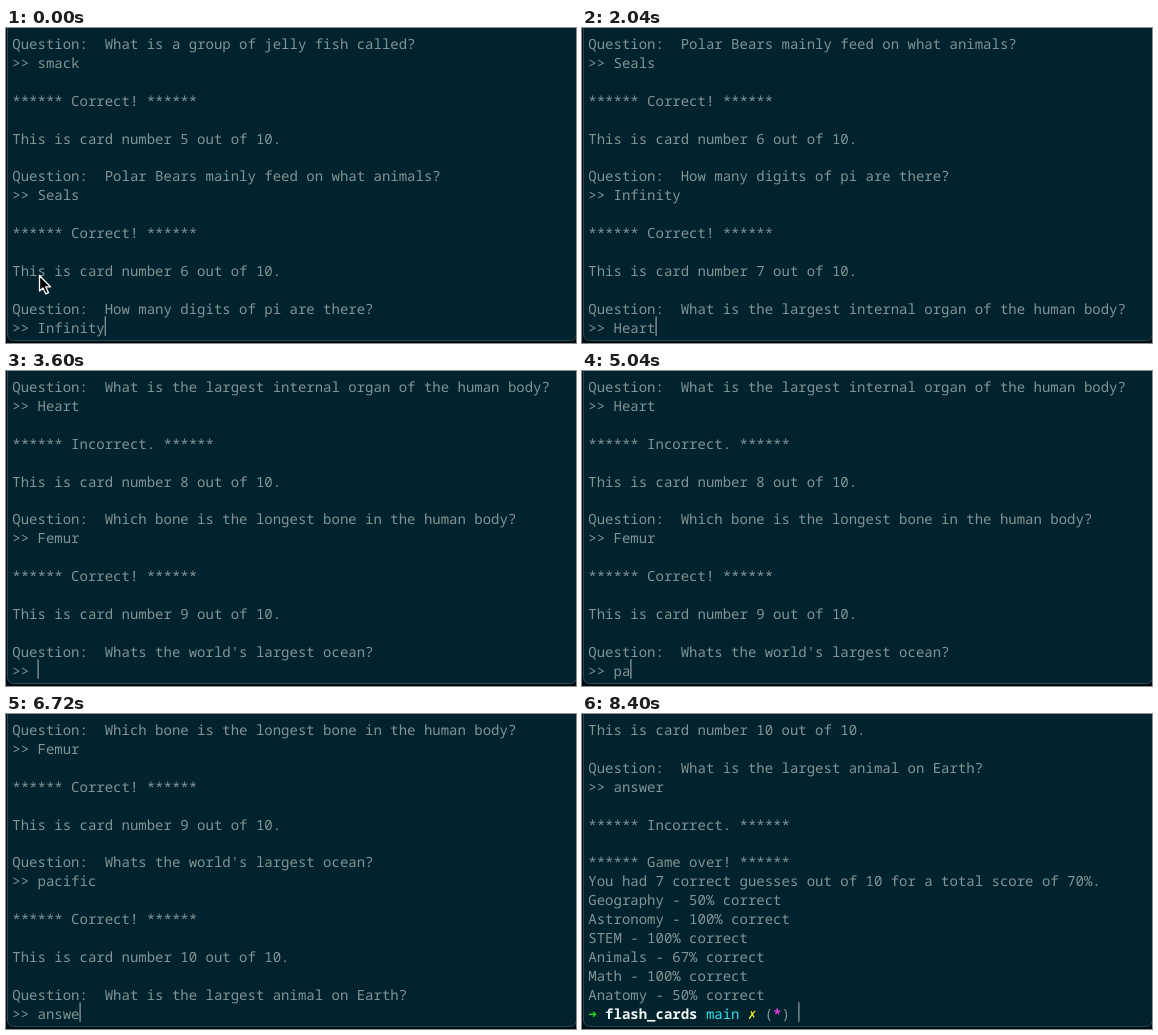
An HTML page for the animation above (8.46 s loop, 570 px wide and 315 px high).

```html
<!DOCTYPE html>
<html lang="en">
<head>
<meta charset="utf-8">
<title>Flash cards in a terminal</title>
<style>
  html, body { margin: 0; width: 100%; height: 100%; overflow: hidden; background: #000d12; }
  svg { display: block; width: 570px; height: 315px; }
  text {
    font: 14px "Noto Sans Mono", "DejaVu Sans Mono", monospace;
    fill: #839496;
    white-space: pre;
    text-rendering: geometricPrecision;
    font-variant-ligatures: none;
  }
  .bold { font-weight: 700; }
</style>
</head>
<body>
<svg viewBox="0 0 570 315">
  <rect x="1.5" y="-10" width="569" height="322.5" rx="6" fill="#01232d" stroke="#34474e"/>
  <g id="screen"></g>
  <rect id="caret" width="1.2" height="19.5" fill="#92a1a2"/>
  <path id="pointer" d="M0 0V15.6L3.5 12.4L6.3 18.4L9 17.2L6.2 11.3H11Z"
        fill="#000" stroke="#fff" stroke-width="1.3" stroke-linejoin="round"/>
</svg>
<script>
const LOOP = 8460, STEP = 60;
const ROWS = 16, LEFT = 6.3, FIRST_BASELINE = 21, CELL = 8.4, LINE = 18.9;
const RIGHT = '****** Correct! ******', WRONG = '****** Incorrect. ******';

// keys: time of each keystroke; enter: time the answer is sent
const cards = [
  { q: 'What is a group of jelly fish called?', a: 'smack', verdict: RIGHT, enter: -1 },
  { q: 'Polar Bears mainly feed on what animals?', a: 'Seals', verdict: RIGHT, enter: -1 },
  { q: 'How many digits of pi are there?', a: 'Infinity', verdict: RIGHT, enter: 60 },
  { q: 'What is the largest internal organ of the human body?', a: 'Heart', verdict: WRONG,
    keys: [1680, 1740, 1860, 1980, 2040], enter: 2100 },
  { q: 'Which bone is the longest bone in the human body?', a: 'Femur', verdict: RIGHT,
    keys: [3240, 3300, 3360, 3480, 3540], enter: 3600 },
  { q: "Whats the world's largest ocean?", a: 'pacific', verdict: RIGHT,
    keys: [4980, 5040, 5100, 5160, 5280, 5340, 5400], enter: 5460 },
  { q: 'What is the largest animal on Earth?', a: 'answer', verdict: WRONG,
    keys: [6240, 6360, 6480, 6600, 6720, 6840], enter: 6960 },
];

const summary = [
  '****** Game over! ******',
  'You had 7 correct guesses out of 10 for a total score of 70%.',
  'Geography - 50% correct', 'Astronomy - 100% correct', 'STEM - 100% correct',
  'Animals - 67% correct', 'Math - 100% correct', 'Anatomy - 50% correct',
];

// column, text, colour, bold
const prompt = [
  [0, '➜', '#1fe81f', true],
  [2, 'flash_cards', '#f4f8f8', true],
  [14, 'main', '#2fe3ea', false],
  [19, '✗', '#f2ea1c', true],
  [21, '(', '#839496', false],
  [22, '*', '#e83ce8', true],
  [23, ')', '#839496', false],
];
const PROMPT_AT = 7080, PROMPT_CARET = 25;

const caretOff = [[840, 1140], [1440, 1680], [2640, 2940], [4440, 4740], [7440, 7740], [8040, 8340]];

const byId = id => document.getElementById(id);
const screen = byId('screen'), caret = byId('caret'), pointer = byId('pointer');

function svg(tag, parent, attrs) {
  const node = document.createElementNS('http://www.w3.org/2000/svg', tag);
  for (const name in attrs) node.setAttribute(name, attrs[name]);
  return parent.appendChild(node);
}

const baseline = row => FIRST_BASELINE + row * LINE;
const column = col => LEFT + col * CELL;
const rows = Array.from({ length: ROWS }, (_, i) =>
  svg('text', screen, { x: LEFT, y: baseline(i) }));

const promptGroup = svg('g', screen, {});
for (const [col, text, colour, bold] of prompt) {
  const node = svg('text', promptGroup, { x: column(col), y: baseline(ROWS - 1), class: bold ? 'bold' : '' });
  node.style.fill = colour;
  node.textContent = text;
}

function transcript(t) {
  const lines = [];
  for (const [i, card] of cards.entries()) {
    const typed = card.keys ? card.keys.filter(k => k <= t).length : card.a.length;
    lines.push(`This is card number ${i + 4} out of 10.`, '',
      `Question:  ${card.q}`, `>> ${card.a.slice(0, typed)}`);
    if (t < card.enter) return lines;
    lines.push('', card.verdict, '');
  }
  return lines.concat(summary, '');
}

function drawPointer(t) {
  const p = Math.min(1, t / 540);
  const eased = p * p * (3 - 2 * p);
  pointer.setAttribute('transform', `translate(${33.5 - 48 * eased} ${247.5 + 46 * eased})`);
  pointer.style.display = p < 1 ? '' : 'none';
}

function draw(t) {
  const lines = transcript(t).slice(-ROWS);
  rows.forEach((row, i) => {
    if (row.textContent !== lines[i]) row.textContent = lines[i];
  });

  const atPrompt = t >= PROMPT_AT;
  promptGroup.style.display = atPrompt ? '' : 'none';

  caret.setAttribute('x', column(atPrompt ? PROMPT_CARET : lines[ROWS - 1].length));
  caret.setAttribute('y', baseline(ROWS - 1) - 16.2);
  caret.style.display = caretOff.some(([from, to]) => t >= from && t < to) ? 'none' : '';

  drawPointer(t);
}

function tick() {
  const t = performance.now() % LOOP;
  draw(Math.floor(t / STEP) * STEP);
  requestAnimationFrame(tick);
}
tick();
</script>
</body>
</html>
```
